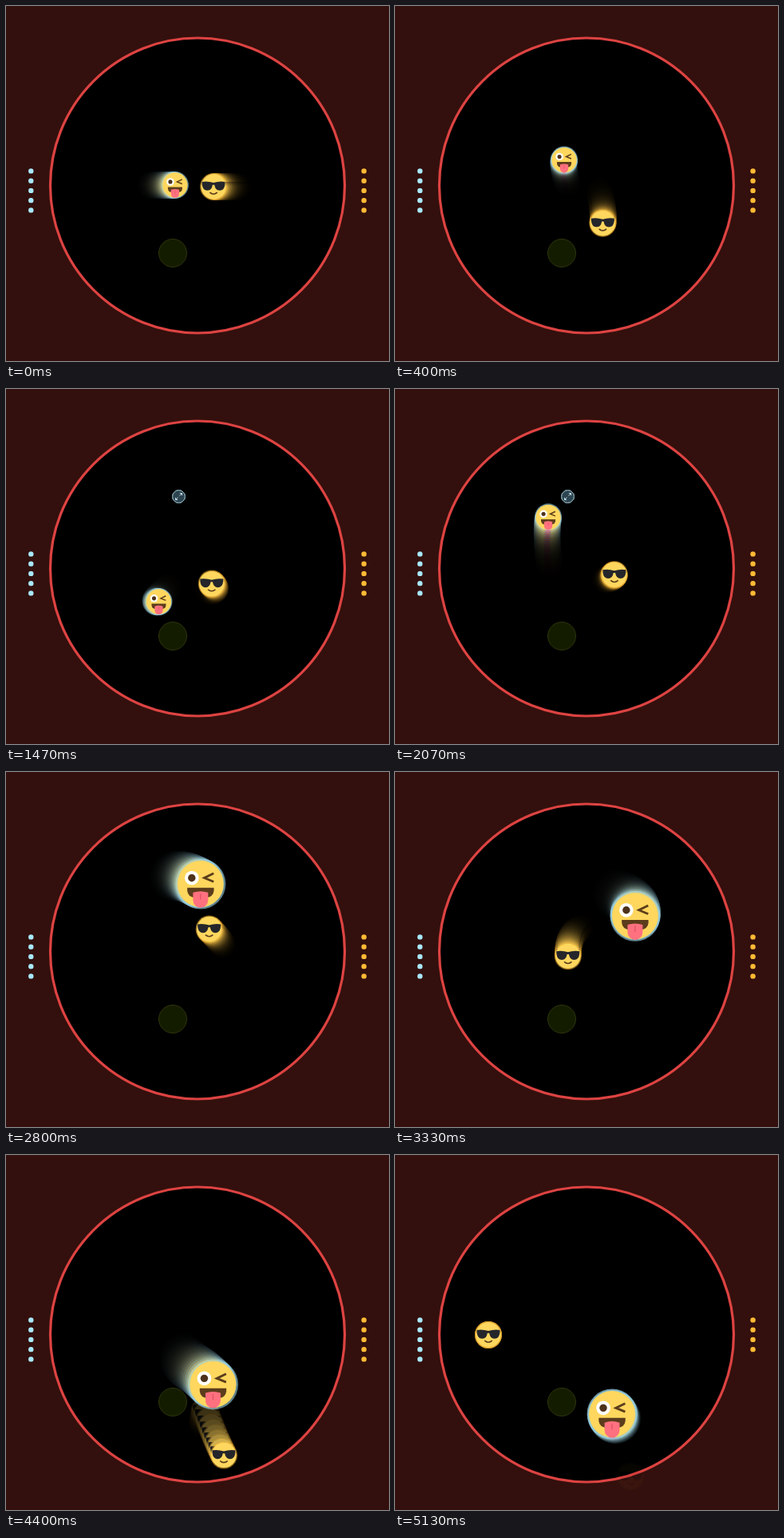
These frames come from a looping animation (480 px wide and 444 px high, 5.19 s). An HTML page with a canvas:

```html
<!DOCTYPE html>
<html>
<head>
<meta charset="utf-8">
<style>
  html, body { margin: 0; height: 100%; overflow: hidden; background: #33100d; }
  canvas { display: block; width: 480px; height: 444px; }
</style>
</head>
<body>
<canvas id="stage"></canvas>
<script>
const LOOP = 5190, STEP = 1000 / 60, TRAIL = 26, FADE = 0.18;
const ICON = 1300, GROW = 2170, FALL = 4870;
const ratio = window.devicePixelRatio || 1;

function sized(canvas) {
  canvas.width = 480 * ratio;
  canvas.height = 444 * ratio;
  const context = canvas.getContext('2d');
  context.scale(ratio, ratio);
  return context;
}

const c = sized(document.getElementById('stage'));
const arena = document.createElement('canvas');

// Between turns each player flies with constant acceleration.
// A turn is x, y and the bend (x, y) of the flight that follows it.
const TURNS = [-600, 45, 935, 1560, 2850, 3560, 4255, 4500, LOOP];
const wink = [
  [165, 224, -6, 0], [217, 224, -16, -29], [243, 215, -30, 20],
  [200, 263, -29, -58], [250, 144, 35, -5], [280, 204, -36, 3],
  [241, 270, 0, -1], [272, 300, 6, 18], [270, 320]
];
const cool = [
  [307, 226, 6, 0], [255, 226, 16, 36], [230, 254, 20, 5],
  [251, 239, 25, 12], [251, 193, -19, -24], [225, 279, 3, 36],
  [249, 318, 2, 12], [286, 395, 0, 0], [304, 409]
];

function pointAt(path, t) {
  const i = Math.max(0, TURNS.findIndex(end => end > t) - 1);
  const u = (t - TURNS[i]) / (TURNS[i + 1] - TURNS[i]);
  const [x, y, bendX, bendY] = path[i], [endX, endY] = path[i + 1];
  const arch = 4 * u * (1 - u);
  return [x + (endX - x) * u + bendX * arch, y + (endY - y) * u + bendY * arch];
}

function disc(g, x, y, r, fill, stroke, width) {
  g.beginPath();
  g.arc(x, y, r, 0, 7);
  g.fillStyle = fill;
  g.fill();
  if (!stroke) return;
  g.strokeStyle = stroke;
  g.lineWidth = width;
  g.stroke();
}

function line(points, width, color) {
  c.beginPath();
  points.forEach(p => c.lineTo(...p));
  c.lineWidth = width;
  c.strokeStyle = color;
  c.stroke();
}

function shape(path, fill) {
  c.fillStyle = fill;
  c.fill(new Path2D(path));
}

function face([x, y], r, rim, features) {
  c.save();
  c.translate(x, y);
  c.scale(r, r);
  disc(c, 0, 0, 1, rim);
  disc(c, 0, 0, 0.92, '#ffd75e');
  features();
  c.restore();
}

function winkFace() {
  disc(c, -0.35, -0.24, 0.28, '#fff');
  disc(c, -0.35, -0.24, 0.15, '#4d321b');
  line([[0.52, -0.42], [0.15, -0.24], [0.52, -0.09]], 0.09, '#5c3d1c');
  shape('M-.53 .15H.53V.27Q.5 .54 .2 .54H-.2Q-.5 .54 -.53 .27Z', '#5c3d1c');
  shape('M-.3 .34Q0 .24 .3 .34V.64A.3 .3 0 0 1-.3 .64Z', '#ff717f');
  line([[0, 0.38], [0, 0.62]], 0.05, '#e2596c');
}

function coolFace() {
  shape('M-.85-.36Q-.4-.42 0-.29Q.4-.42 .85-.36V-.18Q.8 .28 .45 .28Q.13 .28 .07-.13H-.07Q-.13 .28-.45 .28Q-.8 .28-.85-.18Z', '#25262b');
  c.beginPath();
  c.moveTo(-0.28, 0.42);
  c.quadraticCurveTo(0, 0.66, 0.28, 0.42);
  c.lineWidth = 0.09;
  c.strokeStyle = '#5c3d1c';
  c.stroke();
}

function growIcon() {
  disc(c, 216.5, 134.5, 7.8, '#2d4551', '#8fb0ba', 1);
  for (const s of [-1, 1]) {
    const at = (x, y) => [216.5 + s * x, 134.5 - s * y];
    line([at(1, 1), at(4, 4)], 1, '#c3dce2');
    line([at(1.4, 4), at(4, 4), at(4, 1.4)], 1, '#c3dce2');
  }
}

function lives(x, count, color) {
  for (let i = 0; i < count; i++) disc(c, x, 206.4 + i * 12.25, 3.2, color);
}

function drawArena() {
  const g = sized(arena);
  g.fillStyle = '#33100d';
  g.fillRect(0, 0, 480, 444);
  disc(g, 240, 224.5, 184.5, '#000', '#dd4342', 3.2);
  disc(g, 209, 309, 17.5, '#141c00', '#2d350c', 1);
}

function coverWithArena(alpha) {
  c.globalAlpha = alpha;
  c.drawImage(arena, 0, 0, 480, 444);
  c.globalAlpha = 1;
}

function draw(t) {
  coverWithArena(1);
  // Each past step is dimmed a little by the next, leaving the trails.
  for (let k = TRAIL; k >= 0; k--) {
    const s = t - k * STEP;
    coverWithArena(FADE);
    if (s > ICON && s < GROW) growIcon();
    const size = 17 + 14.5 * Math.min(1, Math.max(0, (s - GROW) / 100));
    face(s < FALL ? pointAt(cool, s) : [117, 225], 17, 'rgba(255,187,53,.55)', coolFace);
    face(pointAt(wink, s), size, 'rgba(170,234,255,.55)', winkFace);
  }
  lives(31.3, 5, '#a9e8fb');
  lives(448.6, t < FALL ? 5 : 4, '#ffba35');
}

drawArena();
const start = performance.now();
function tick() {
  draw((performance.now() - start) % LOOP);
  requestAnimationFrame(tick);
}
tick();
</script>
</body>
</html>
```
